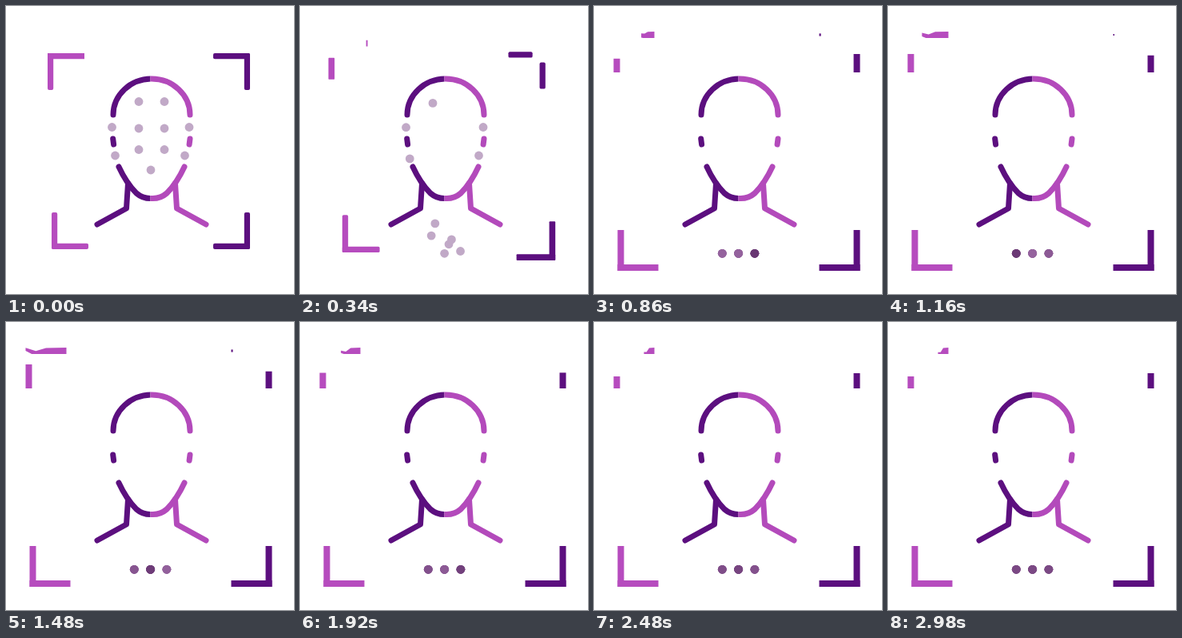
These frames come from a looping animation (360x360 px, 3 s). An HTML page:

```html
<!DOCTYPE html>
<html lang="en">
<head>
<meta charset="utf-8">
<title>Face scan</title>
<style>
  html, body { margin: 0; width: 100%; height: 100%; overflow: hidden; background: #fff; }
  svg { display: block; width: 100vw; height: 100vh; }
  .face { fill: none; stroke-width: 7; stroke-linecap: round; stroke-linejoin: round; }
  .dark { stroke: #5c0f7f; }
  .light { stroke: #b34abb; }
</style>
</head>
<body>
<svg viewBox="0 0 360 360">
  <clipPath id="left"><path d="M0 0H180.5V360H0z"/></clipPath>
  <clipPath id="right"><path d="M180.5 0H360V360H180.5z"/></clipPath>
  <g class="face dark" clip-path="url(#left)">
    <path d="M134 136A48 45 0 0 1 182 91M133.7 166L134.6 173M141 201C147 214 154 225 163 234Q171 241 182 240.5"/>
    <path d="M152.5 222L150.5 253L114 273"/>
  </g>
  <g class="face light" clip-path="url(#right)">
    <path d="M230 136A48 45 0 0 0 182 91H180M230 166L229.1 173M223 201C217 214 210 225 201 234Q193 241 182 240.5H180"/>
    <path d="M211.5 222L213.5 253L250 273"/>
  </g>
  <g id="corners"></g>
  <g id="dots"></g>
</svg>
<script>
const LOOP = 3000, STEP = 20;
const LIGHT = '#b64cbe', DARK = '#5c0f7f';

const set = (node, attrs) => {
  for (const key in attrs) node.setAttribute(key, attrs[key]);
  return node;
};
const el = (name, parent, attrs = {}) => {
  const node = document.createElementNS('http://www.w3.org/2000/svg', name);
  document.getElementById(parent).appendChild(node);
  return set(node, attrs);
};
const clamp = v => Math.max(0, Math.min(1, v));
const lerp = (a, b, p) => a + (b - a) * p;
const mix = (a, b, p) => a.map((v, i) => lerp(v, b[i], p));
const inOut = u => u < 0.5 ? 4 * u ** 3 : 1 - 4 * (1 - u) ** 3;
const decay = (ms, span) => Math.exp(-Math.max(0, ms) / span);

// Damped spring from 0 to 1 with about 10% overshoot
const spring = ms => {
  if (ms <= 0) return 0;
  const w = ms * Math.PI / 180, damp = 0.73;
  return 1 - Math.exp(-damp * w) * (Math.cos(w) + damp * Math.sin(w));
};

// The upper corners wear away, and the left one swells back once mid-loop
const swell = t => Math.exp(-(((t - 1480) / 400) ** 2));
const worn = (t, { fade, rest, gain }) =>
  46 * decay(t - 260, fade) + (rest + gain * swell(t)) * clamp((t - 340) / 400);

// sx, sy: outward direction of each corner
const corners = [
  { sx: -1, sy: -1, start: 268, color: LIGHT, ragged: true,
    across: { fade: 25, rest: 13, gain: 38 }, down: { fade: 150, rest: 15, gain: 15 } },
  { sx: 1, sy: -1, start: 322, color: DARK,
    across: { fade: 190, rest: 0, gain: 2 }, down: { fade: 240, rest: 19, gain: 2 } },
  { sx: -1, sy: 1, start: 311, color: LIGHT },
  { sx: 1, sy: 1, start: 276, color: DARK }
];
for (const c of corners) {
  c.x = c.sx > 0 ? 305 : c.sy > 0 ? 57 : 52;
  c.y = c.sy > 0 ? 304 : 59;
  c.h = el(c.ragged ? 'path' : 'rect', 'corners', { fill: c.color });
  c.v = el('rect', 'corners', { fill: c.color });
}

const raggedArm = (right, top, len, thick, t) => {
  if (len < 0.5) return '';
  const bottom = top + thick, lift = 4 * swell(t);
  const notch = thick * 0.75 * (1 - decay(t - 340, 900));
  const at = f => right - len * f;
  return `M${at(1)} ${top + notch - lift}L${at(0.75)} ${top + notch}L${at(0.5)} ${top + notch * 0.1}` +
    `L${right} ${top}V${bottom}H${at(0.85)}L${at(1)} ${bottom - lift}Z`;
};

const drawCorner = (c, t) => {
  const p = spring(t - c.start);
  const arm = lerp(46, 51, p), thick = lerp(7.2, 8, p), rx = 2 * clamp(1 - p);
  const x = c.x + c.sx * 27.5 * p, y = c.y + c.sy * 27 * p;
  const acrossLen = c.across && t > 260 ? Math.min(arm, worn(t, c.across)) : arm;
  const downLen = c.down && t > 260 ? Math.min(arm, worn(t, c.down)) : arm;
  const top = c.sy < 0 ? y : y - thick;

  if (c.ragged) {
    c.h.setAttribute('d', raggedArm(x + arm, top, acrossLen, thick, t));
  } else {
    const height = acrossLen < 0.7 ? 0 : Math.min(thick, acrossLen * 1.5);
    set(c.h, {
      x: c.sx < 0 ? x + arm - acrossLen : x - arm,
      y: top + (thick - height) / 2,
      width: acrossLen, height, rx
    });
  }
  set(c.v, {
    x: c.sx < 0 ? x : x - thick,
    y: c.sy < 0 ? y + arm - downLen : y - arm,
    width: thick, height: downLen, rx
  });
};

// Dots leave in two waves, each in the order listed
const LOW_ROW = 179.5;
const firstWave = [[181, 205], [198, LOW_ROW], [198, 119.5], [198, 153], [166, LOW_ROW], [166, 153]];
const secondWave = [[136.5, 187], [166, 119.5], [132.5, 151.5], [223.5, 187], [229, 151.5]];

const makeDot = ([x, y], start) => {
  const inner = Math.abs(x - 181) < 20;
  const slot = inner && y !== LOW_ROW ? 1 : x < 181 ? 0 : 2;
  return { x, y, start, slot, lag: inner ? 6 : 1, node: el('circle', 'dots', { r: 5.4 }) };
};
const dots = [
  ...firstWave.map((point, i) => makeDot(point, 133 * Math.sqrt(i / 5))),
  ...secondWave.map((point, i) => makeDot(point, 272 + 22 * i))
];

const PALE = [193, 169, 199], SOFT = [172, 122, 180], DEEP = [98, 48, 108];

const slotColor = (slot, t) => {
  const swing = 0.4 * clamp((2980 - t) / 2100);
  const pulse = Math.cos((t - 1193 - slot * 333) * Math.PI / 500);
  const depth = lerp(0.52, 0.66, clamp((t - 860) / 2120)) + swing * pulse;
  const shade = mix(SOFT, DEEP, clamp(depth));
  return `rgb(${mix(PALE, shade, clamp((t - 440) / 360)).map(Math.round)})`;
};

const drawDot = (d, t) => {
  const p = inOut(clamp((t - d.start) / 340));
  set(d.node, {
    cx: lerp(d.x, 160.3 + 20.3 * d.slot, p ** d.lag),
    cy: lerp(d.y, 309.3, p),
    fill: slotColor(d.slot, t)
  });
};

const render = t => {
  corners.forEach(c => drawCorner(c, t));
  dots.forEach(d => drawDot(d, t));
};

let origin;
const tick = now => {
  origin ??= now;
  render(Math.floor(((now - origin) % LOOP) / STEP) * STEP);
  requestAnimationFrame(tick);
};
render(0);
requestAnimationFrame(tick);
</script>
</body>
</html>
```
